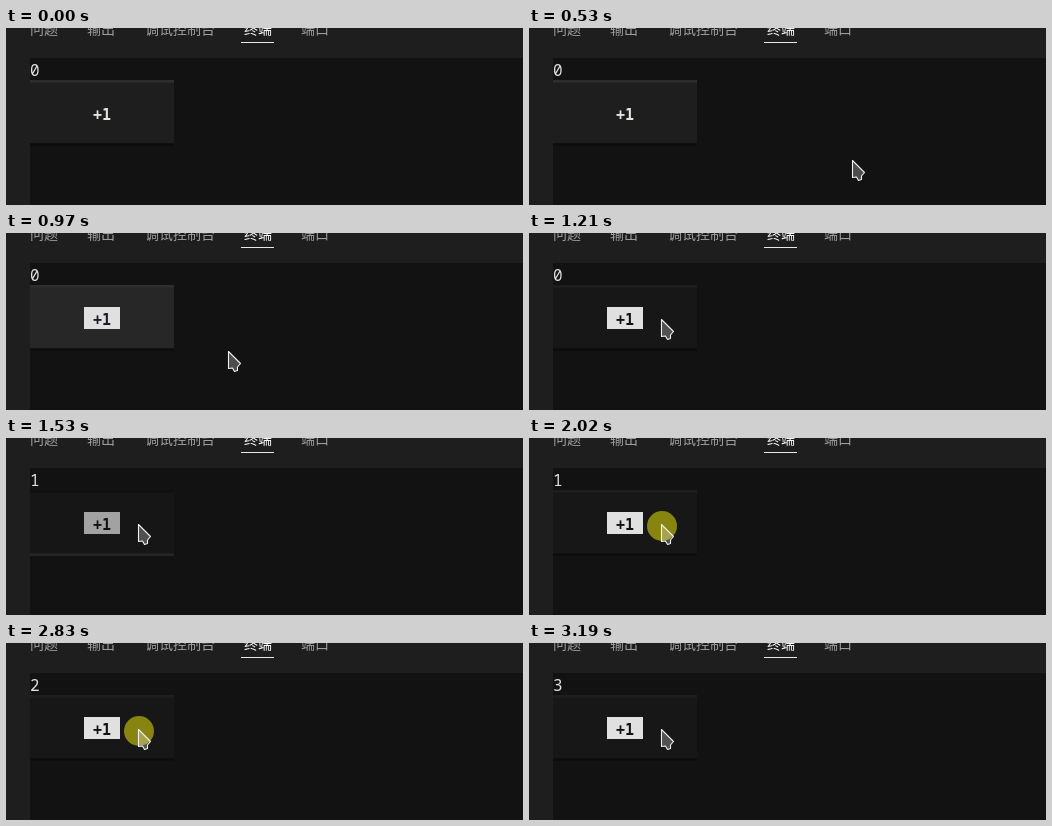
An HTML page that plays this animation: 517 by 177 pixels, repeating every 4260 ms.

```html
<!DOCTYPE html>
<html lang="zh-CN">
<head>
<meta charset="utf-8">
<style>
  html, body { margin: 0; width: 100%; height: 100%; overflow: hidden; background: #1e1e1e; }
  svg { display: block; }
  .tab { font: 14px "Noto Sans CJK SC", "Noto Sans CJK", sans-serif; fill: #9d9d9d; }
  .tab.active { fill: #fff; }
  .count { font: 500 16px "Noto Sans Mono", monospace; fill: #e0e0e0; }
  .caption { font: bold 15px "DejaVu Sans Mono", monospace; }
</style>
</head>
<body>
<svg width="517" height="177" viewBox="0 0 517 177">
  <rect width="517" height="177" fill="#1e1e1e"/>
  <g class="tab">
    <text x="24" y="6">问题</text>
    <text x="81" y="6">输出</text>
    <text x="139" y="6">调试控制台</text>
    <text x="238" y="6" class="tab active">终端</text>
    <text x="295" y="6">端口</text>
  </g>
  <rect x="235" y="14" width="33" height="1" fill="#e8e8e8"/>
  <rect x="24" y="30" width="493" height="147" fill="#121212"/>
  <text id="count" class="count" x="24" y="48">0</text>
  <rect id="face" x="24" y="52" width="144" height="66"/>
  <rect id="topEdge" x="24" y="52" width="144" height="2.75"/>
  <rect id="bottomEdge" x="24" y="115.25" width="144" height="2.75"/>
  <rect id="label" x="78" y="74" width="36" height="22"/>
  <text id="caption" class="caption" x="87" y="92">+1</text>
  <circle id="press" cx="133" cy="88" r="15" fill="#87850f"/>
  <path id="pointer" d="M.5.5V17.5L4.5 17 6.5 20.5 9.5 19.5V16L12.5 12.5Z"
        fill="#fff" fill-opacity=".25" stroke="#f0f0f0" stroke-width="1.1" stroke-linejoin="round"/>
</svg>
<script>
const LOOP = 4260;
const el = id => document.getElementById(id);
const [count, face, topEdge, bottomEdge, label, caption, press, pointer] =
  ["count", "face", "topEdge", "bottomEdge", "label", "caption", "press", "pointer"].map(el);

// Pointer path: time, x, y
const path = [
  [250, 325, 168], [330, 326, 151], [410, 325, 140], [530, 323, 132], [730, 323, 131],
  [810, 306, 131], [890, 271, 127], [970, 222, 118], [1050, 174, 108],
  [1130, 144, 100], [1170, 137, 93], [1210, 132, 86]
];

// Each click: pointer down, button active, pointer up, button released
const clicks = [
  [1370, 1490, 1530, 1690],
  [2020, 2140, 2180, 2340],
  [2830, 2990, 3030, 3190]
];

const looks = {
  blurred: { face: "#1e1e1e", top: "#2d2d2d", bottom: "#0d0d0d", label: "none", text: "#e6e6e0" },
  focused: { face: "#272727", top: "#2d2d2d", bottom: "#0d0d0d", label: "#e0e0e0", text: "#1b1b2b" },
  hovered: { face: "#171717", top: "#1e1e1e", bottom: "#0d0d0d", label: "#e0e0e0", text: "#111111" },
  active:  { face: "#161616", top: "#101010", bottom: "#252525", label: "#a2a2a2", text: "#121212" }
};

function pointerAt(t) {
  const stepped = 250 + Math.floor((t - 250) / 40) * 40;
  const next = path.findIndex(p => p[0] > stepped);
  if (next < 0) return path[path.length - 1].slice(1);
  const [t0, x0, y0] = path[next - 1], [t1, x1, y1] = path[next];
  const k = (stepped - t0) / (t1 - t0);
  return [x0 + (x1 - x0) * k, y0 + (y1 - y0) * k].map(Math.round);
}

function render(t) {
  const visible = t >= 250;
  const [x, y] = visible ? pointerAt(t) : [0, 0];
  const hovering = visible && x < 168 && y < 118;
  const focused = (t >= 40 && t < 250) || t >= 650;
  const active = clicks.some(c => t >= c[1] && t < c[3]);
  const look = looks[active ? "active" : hovering ? "hovered" : focused ? "focused" : "blurred"];

  face.setAttribute("fill", look.face);
  topEdge.setAttribute("fill", look.top);
  bottomEdge.setAttribute("fill", look.bottom);
  label.setAttribute("fill", look.label);
  caption.style.fill = look.text;
  count.textContent = clicks.filter(c => t >= c[1]).length;
  press.style.display = clicks.some(c => t >= c[0] && t < c[2]) ? "" : "none";
  pointer.style.display = visible ? "" : "none";
  pointer.setAttribute("transform", `translate(${x} ${y})`);
}

const start = performance.now();
function tick() {
  render((performance.now() - start) % LOOP);
  requestAnimationFrame(tick);
}
tick();
</script>
</body>
</html>
```
